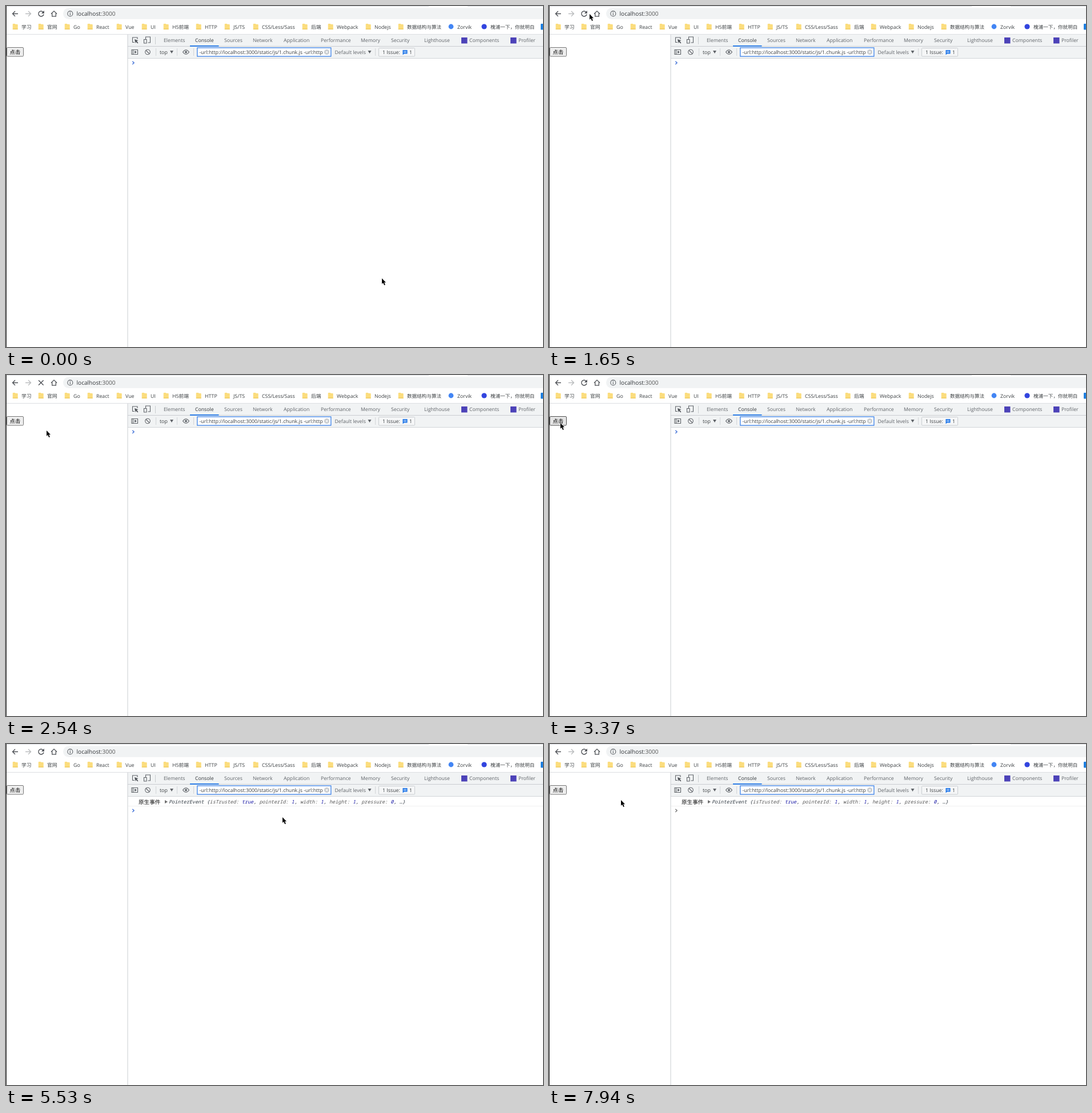
Animation of 940x596 px, one loop 8000 ms. Source, as an HTML page:

```html
<!DOCTYPE html>
<html lang="zh">
<head>
<meta charset="utf-8">
<title>Console</title>
<style>
  html, body { margin: 0; width: 100%; height: 100%; overflow: hidden; background: #fff; }
  svg { display: block; width: 100%; height: 100%; }
  text { font: 8.8px "Open Sans", "Noto Sans CJK SC", "Noto Sans CJK", sans-serif; fill: #3c4043;
         white-space: pre; text-rendering: geometricPrecision; }
  .url { font-size: 10.1px; fill: #33363a; }
  .tab { font-size: 8.7px; fill: #5f6368; }
  .cjk { font-size: 8.6px; }
  .btn { font-size: 9.4px; fill: #000; text-anchor: middle; }
  .mono { font: 8.53px "Noto Sans Mono", "Noto Sans CJK SC", "Noto Sans CJK", monospace; fill: #303942; }
  .log { font-size: 9.6px; fill: #111; }
  .it { font-style: italic; }
  .key { fill: #881391; }
  .val { fill: #1a1aa6; }
  .str { fill: #c41a16; }
  .dim { fill: #808080; }
  .pre { fill: #565656; }
  .ln { fill: none; stroke: #5f6368; stroke-width: 1.1; }
  .nav { fill: none; stroke: #505358; stroke-width: 1.4; }
</style>
</head>
<body>
<svg id="stage" viewBox="0 0 940 596"></svg>
<script>
const LOOP = 8000;
const ROW = 12.42;

const rect = (x, y, w, h, fill, more = '') =>
  `<rect x="${x}" y="${y}" width="${w}" height="${h}" fill="${fill}" ${more}/>`;
const text = (x, y, str, cls = '') => `<text x="${x}" y="${y}" class="${cls}">${str}</text>`;
const path = (d, cls, more = '') => `<path d="${d}" class="${cls}" ${more}/>`;
const solid = (d, fill) => `<path d="${d}" fill="${fill}"/>`;
const span = (cls, str) => `<tspan class="${cls}">${str}</tspan>`;
const group = (id, body) => `<g id="${id}">${body}</g>`;
const right = (x, y) => solid(`M${x} ${y - 3}l5 3l-5 3z`, '#6e6e6e');
const down = (x, y, w = 6) => solid(`M${x} ${y - 2.5}h${w}l${-w / 2} 5z`, '#5f6368');

function navBar() {
  return rect(0, 0, 740, 1, '#dee1e6') + rect(808, 0, 132, 1, '#dee1e6') +
    rect(100, 3.5, 860, 19.5, '#f1f3f4', 'rx="9.75"') +
    path('M21 13.5H11.5M16 9l-4.5 4.5L16 18', 'nav') +
    path('M34 13.5h9.5M39 9l4.5 4.5L39 18', 'nav', 'style="stroke:#babcbe"') +
    group('reload', path('M65.3 11A4.6 4.6 0 1 0 66 14.5', 'nav') + solid('M66.8 8v5h-5z', '#505358')) +
    group('stop', path('M57 9.2l8.6 8.6M65.6 9.2L57 17.8', 'nav')) +
    path('M79 13.8l5-5l5 5M80.7 12.8v5.4h6.6v-5.4', 'nav', 'style="stroke-width:1.3"') +
    '<circle cx="112.3" cy="13.4" r="4.5" class="ln"/>' +
    rect(111.7, 12.6, 1.2, 3.4, '#5f6368') + rect(111.7, 10.6, 1.2, 1.2, '#5f6368') +
    text(123.5, 17, 'localhost' + span('pre', ':3000'), 'url');
}

function bookmarks() {
  const list = [[27, '学习'], [72, '官网'], [118, 'Go'], [158, 'React'], [209, 'Vue'], [253, 'UI'],
    [291, 'H5前端'], [348, 'HTTP'], [398, 'JS/TS'], [448, 'CSS/Less/Sass'], [534, '后端'],
    [579, 'Webpack'], [645, 'Nodejs'], [702, '数据结构与算法', 'cjk']];
  const folder = x => solid(`M${x} 32q0-1 1-1h3l1.2 1h2.8q1 0 1 1v7q0 1-1 1h-7q-1 0-1-1z`, '#fbdd7e') +
    rect(x, 39.8, 9, 1.2, '#efc95c', 'rx=".6"');
  return list.map(([x, s, cls]) => folder(x - 15.3) + text(x, 39.7, s, cls)).join('') +
    '<circle cx="779" cy="36" r="4.4" fill="#4285f4"/>' + text(790, 39.7, 'Zorvik') +
    '<circle cx="837" cy="36" r="4.6" fill="#3245df"/>' + text(848, 39.7, '槐浦一下，你就明白', 'cjk') +
    rect(936, 31, 6, 10.5, '#1d7fe0', 'rx="1"');
}

function tabs() {
  const list = [[276, 'Elements'], [331, 'Console'], [382, 'Sources'], [432, 'Network'], [486, 'Application'],
    [551, 'Performance'], [621, 'Memory'], [674, 'Security'], [732, 'Lighthouse'], [811, 'Components'], [897, 'Profiler']];
  const label = ([x, s]) => text(x, 63.3, s === 'Console' ? `<tspan fill="#303438">${s}</tspan>` : s, 'tab');
  return rect(213, 50, 727, 41, '#f1f3f4') +
    rect(213, 70, 727, 1, '#cacdd1') + rect(213, 91, 727, 1, '#d3d6d9') +
    rect(322, 69, 50.5, 1.8, '#1a73e8') +
    path('M225 63.5h-3.5v-8.5h8.5v3', 'ln') + solid('M225 58l6.5 2.6l-2.7 1l2.6 2.7l-1.1 1.1l-2.7-2.7l-1 2.6z', '#4f5358') +
    path('M244.5 58.5v-4.5h8v10h-4M241.5 58.5h4.5v6.5h-4.5z', 'ln') +
    rect(261, 54, 1, 13, '#cacdd1') +
    list.map(label).join('') +
    rect(797, 55, 10.5, 10.5, '#4c42b8') + rect(883, 55, 10.5, 10.5, '#4c42b8');
}

function issueBox(id, w, body) {
  return group(id, rect(652.5, 73.5, w, 14.5, '#f5f6f7', 'stroke="#cacdd1" rx="1"') + body);
}

function filterBar() {
  const bubble = (x, fill) => solid(`M${x} 77h8v6.5h-5.5l-2.5 2z`, fill);
  return path('M220 76.5h10.5v8h-10.5zM222.5 76.5v8', 'ln') + solid('M225 78l4 2.5l-4 2.5z', '#5f6368') +
    '<circle cx="248" cy="80.5" r="4.3" class="ln"/>' + path('M245 77.5l6 6', 'ln') +
    [262, 299, 328, 646].map(x => rect(x, 74, 1, 13, '#d3d6d9')).join('') +
    text(269, 83.7, 'top') + down(287, 80.5) +
    path('M309.5 80.5q5.5-7.5 11 0q-5.5 7.5-11 0z', 'ln') + '<circle cx="315" cy="80.5" r="1.9" fill="#5f6368"/>' +
    rect(334.8, 73, 234, 15, '#fff', 'stroke="#3b82e8" stroke-width="1.3"') +
    text(338.5, 84, '-url:http://localhost:3000/static/js/1.chunk.js -url:http') +
    '<circle cx="561.5" cy="80.5" r="4.5" fill="#c8cbce"/>' +
    path('M559.7 78.7l3.6 3.6M563.3 78.7l-3.6 3.6', 'ln', 'style="stroke:#fff"') +
    text(575.5, 83.7, 'Default levels', 'tab') + down(633.5, 80.5) +
    issueBox('issue', 63, text(659, 83.7, '1 Issue:') + bubble(694.5, '#1a73e8') +
      rect(696, 78.7, 5, .8, '#fff') + rect(696, 80.8, 5, .8, '#fff') + text(706, 83.7, '1')) +
    issueBox('noIssue', 72, bubble(660.5, '#80868b') + text(673, 83.7, 'No Issues'));
}

function logLine() {
  const pairs = [['isTrusted', 'true'], ['pointerId', 1], ['width', 1], ['height', 1], ['pressure', 0]];
  const body = pairs.map(([k, v]) => span('pre', k + ': ') + span('val', v) + ', ').join('');
  return text(232, 104.5, '原生事件', 'mono log') +
    text(285, 103.9, `PointerEvent {${body}…}`, 'mono it');
}

function details() {
  const props = ('altKey false|altitudeAngle 1.5707963267948966|azimuthAngle 0|bubbles true|button 0|buttons 0|' +
    'cancelBubble false|cancelable true|clientX 20|clientY 44|composed true|ctrlKey false|currentTarget null|' +
    'defaultPrevented false|detail 1|eventPhase 0|fromElement null|height 1|isPrimary false|isTrusted true|' +
    'layerX 20|layerY 44|metaKey false|movementX 0|movementY 0|offsetX 18|offsetY 10|pageX 20|pageY 44|path|' +
    'pointerId 1|pointerType "mouse"|pressure 0|relatedTarget null|returnValue true|screenX 20|screenY 147|' +
    'shiftKey false|sourceCapabilities|srcElement').split('|');
  const tag = (name, rest = '') => span('key', name) + span('val', rest);
  const nodes = [tag('button'), tag('div', '.App'), tag('div', '#root'), tag('body'), tag('html'), 'document', 'Window'];
  const nested = {
    path: span('dim', '(7) ') + `[${nodes.join(', ')}]`,
    sourceCapabilities: 'InputDeviceCapabilities {' + span('key', 'firesTouchEvents') + ': ' + span('val', 'false') + '}',
    srcElement: tag('button')
  };
  const kind = v => v === 'null' ? 'dim' : v[0] === '"' ? 'str' : 'val';
  return props.map((p, i) => {
    const [key, v] = p.split(' ');
    const y = 113.6 + i * ROW;
    return (nested[key] ? right(287.5, y) : '') +
      text(294.3, y + 2.9, span('key', key) + ': ' + (nested[key] || span(kind(v), v)), 'mono');
  }).join('') + rect(705, 96.5, 8.5, 8.5, '#4f71ad', 'rx="1.5"') +
    rect(708.6, 100, 1.3, 3.5, '#fff') + rect(708.6, 98, 1.3, 1.2, '#fff') + down(277, 101);
}

const stage = document.getElementById('stage');
stage.innerHTML = rect(0, 0, 940, 596, '#fff') + navBar() + bookmarks() +
  rect(0, 49, 940, 1, '#dcdee1') + tabs() + filterBar() + rect(212.5, 50, 1, 546, '#cacdd1') +
  rect(1.5, 72.5, 29, 15.5, '#efefef', 'id="button" rx="1.5"') + text(16, 83.8, '点击', 'btn') +
  group('log', logLine() + group('closed', right(278, 101) + rect(214, 108, 726, 1, '#f0f0f0')) + group('open', details())) +
  path('M221.3 96.7l2.8 2.6l-2.8 2.6', 'nav', 'id="prompt"') +
  rect(0, 0, 1, 596, '#2b2b2b') +
  '<path id="cursor" d="M0 0v9.8l2.2-2l1.9 4.3l1.8-.8l-1.900-4.100h3z" stroke="#fff" stroke-width=".8" paint-order="stroke"/>';

const el = {};
stage.querySelectorAll('[id]').forEach(n => el[n.id] = n);

// Pointer strokes: first step, last step, step count, waypoints evenly spaced in time
const strokes = [
  [70, 810, 11, [[658, 476], [600, 437], [440, 335], [290, 243], [195, 185], [171, 171]]],
  [880, 1650, 12, [[171, 171], [110, 110], [50, 55], [19, 24], [38, 11], [60, 9], [71, 14]]],
  [1720, 2470, 12, [[71, 14], [66, 10], [63, 11], [60, 30], [58, 75], [62, 103], [71, 97]]],
  [2540, 3300, 12, [[71, 97], [71, 97], [66, 115], [52, 136], [38, 126], [28, 100], [25, 86]]],
  [3370, 3440, 2, [[25, 86], [15, 81]]],
  [4710, 5460, 11, [[15, 81], [40, 86], [120, 98], [230, 106], [340, 109], [421, 110]]],
  [5530, 6090, 8, [[421, 110], [484, 128], [509, 132], [500, 130], [450, 122], [380, 112], [310, 106], [280, 104], [276, 104]]],
  [6260, 6320, 2, [[276, 104], [278, 102]]],
  [7660, 7940, 5, [[278, 102], [240, 103], [180, 101], [140, 99], [126, 98]]]
];

function pointer(t) {
  const past = strokes.filter(s => t >= s[0]);
  if (!past.length) return strokes[0][3][0];
  const [from, to, steps, pts] = past[past.length - 1];
  const step = Math.floor((t - from) / (to - from) * (steps - 1) + 1e-6) + 1;
  const pos = Math.min(1, step / steps) * (pts.length - 1);
  const i = Math.min(Math.floor(pos), pts.length - 2);
  return pts[i].map((v, k) => v + (pts[i + 1][k] - v) * (pos - i));
}

const show = (node, on) => node.setAttribute('display', on ? 'inline' : 'none');
const within = (t, a, b) => t >= a && t < b;

function draw(t) {
  const loading = within(t, 1860, 3370);
  const noIssue = within(t, 2000, 2540);
  const logged = t >= 4250;
  const open = within(t, 6590, 7250);
  const [fill, stroke] = within(t, 4110, 4250) ? ['#f5f5f5', '#8d8d8d']
    : within(t, 3370, 4780) ? ['#e5e5e5', '#4f4f4f'] : ['#efefef', '#767676'];
  show(el.reload, !loading);
  show(el.stop, loading);
  show(el.issue, !noIssue);
  show(el.noIssue, noIssue);
  show(el.log, logged);
  show(el.closed, !open);
  show(el.open, open);
  show(el.prompt, !open);
  el.prompt.style.stroke = t >= 6520 ? '#777' : '#4272d8';
  el.prompt.setAttribute('transform', `translate(0 ${logged ? 17 : 0})`);
  el.button.setAttribute('fill', fill);
  el.button.setAttribute('stroke', stroke);
  el.cursor.setAttribute('transform', `translate(${pointer(t).map(Math.round).join(' ')})`);
}

const start = performance.now();
function tick() {
  draw((performance.now() - start) % LOOP);
  requestAnimationFrame(tick);
}
tick();
</script>
</body>
</html>
```
